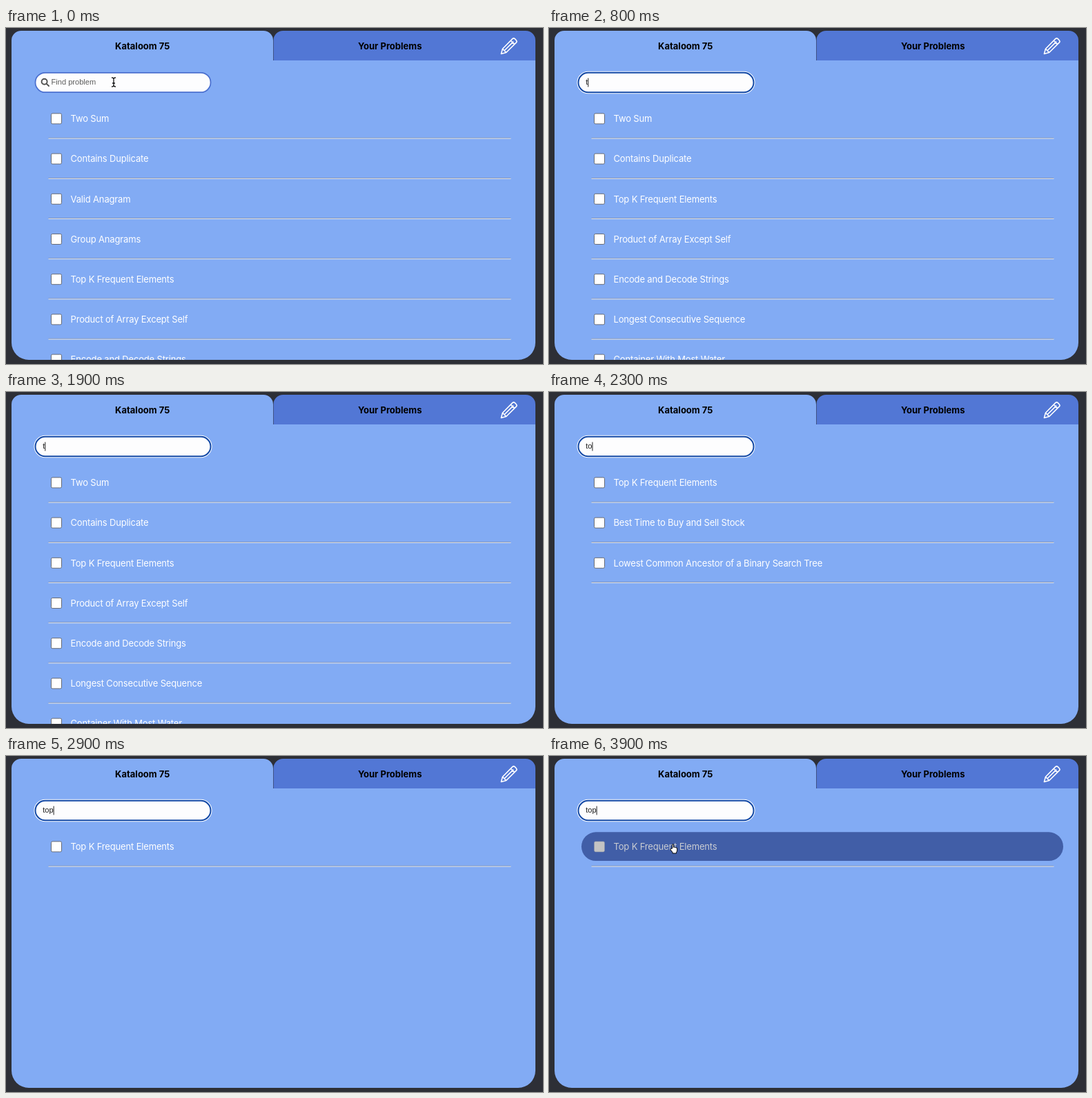
Recreate the animation shown at these times as an HTML page. Size 778 px wide and 487 px high, loop 4 s.

```html
<!DOCTYPE html>
<html lang="en">
<head>
<meta charset="utf-8">
<title>Problem search</title>
<style>
  html, body { margin: 0; width: 100%; height: 100%; overflow: hidden; background: #2d2f36; }
  svg { display: block; }
  .tab { font: 700 13px Inter, sans-serif; text-anchor: middle; }
  .row { font: 400 13px Inter, sans-serif; letter-spacing: -.16px; fill: #fff; }
  .box { fill: #fff; stroke: #686c75; }
  .pill { fill: none; }
  .hover .pill { fill: #415ea7; }
  .hover text { fill: #c9ccd2; }
  .hover .box { fill: #c3c3c3; stroke: #8f96a6; stroke-width: .6; }
  #query { font: 11.1px "Liberation Sans", Arial, sans-serif; }
  #field { fill: #fdfdfe; stroke: #4a6fcf; stroke-width: 1.7; }
  .focus #field { stroke: #1148a6; stroke-width: 2; }
  #ring { fill: none; stroke: #fff; stroke-width: 4; visibility: hidden; }
  .focus #ring { visibility: visible; }
  .focus #lens { visibility: hidden; }
</style>
</head>
<body>
<svg id="stage" width="778" height="487" viewBox="0 0 778 487">
  <defs>
    <path id="card" d="M8 18a14 14 0 0 1 14-14H373a14 14 0 0 1 14 14V47H767V456a25 25 0 0 1-25 25H33a25 25 0 0 1-25-25Z"/>
    <clipPath id="inside"><use href="#card"/></clipPath>
  </defs>
  <use href="#card" fill="#82abf4"/>
  <path d="M387.5 47V18a14 14 0 0 1 14-14H753a14 14 0 0 1 14 14V47Z" fill="#5277d5"/>
  <text class="tab" x="197.7" y="30.6">Kataloom 75</text>
  <text class="tab" x="556.2" y="30.6">Your Problems</text>
  <path d="M717.4 37.4L719.4 30.2L733.8 15.6Q735.5 14 737.2 15.6L739.2 17.7Q740.8 19.4 739.2 21.1L724.7 35.5ZM719.4 30.2L724.7 35.5M722 32.8L735.2 19.6M731.2 18.2L736.6 23.6"
    fill="none" stroke="#fff" stroke-width="1.6" stroke-linejoin="round"/>

  <g id="search">
    <rect id="ring" x="42.5" y="64.8" width="254" height="28.4" rx="14.2"/>
    <rect id="field" x="42.5" y="64.8" width="254" height="28.4" rx="14.2"/>
    <path id="lens" d="M59.3 81.3L62 84M59.6 77.7a4 4 0 1 1-8 0a4 4 0 1 1 8 0Z"
      fill="none" stroke="#505050" stroke-width="1.9" stroke-linecap="round"/>
    <text id="query" y="82.4"></text>
    <rect id="caret" y="72.6" width="1" height="12.8" fill="#222"/>
  </g>

  <g id="rows" clip-path="url(#inside)"></g>

  <g id="beam" fill="none" stroke-linecap="round">
    <path d="M-2.5-6.5Q0-6.5 0-4.5Q0-6.5 2.5-6.5M0-4.5V4.5M-2.5 6.5Q0 6.5 0 4.5Q0 6.5 2.5 6.5M-1.5 1.5H1.5" stroke="#fff" stroke-width="2.6"/>
    <path d="M-2.5-6.5Q0-6.5 0-4.5Q0-6.5 2.5-6.5M0-4.5V4.5M-2.5 6.5Q0 6.5 0 4.5Q0 6.5 2.5 6.5M-1.5 1.5H1.5" stroke="#111" stroke-width="1.3"/>
  </g>
  <path id="arrow" d="M0 0V11.3L2.6 8.9L4.6 13.4L6.6 12.5L4.6 8.1H8Z" fill="#000" stroke="#fff" stroke-width=".9"/>
  <path id="hand" d="M-2.4 0V-5Q-2.4-6.3-1.4-6.3T-.4-5V-1.6Q.6-2.5 1.4-1.4Q2.4-2.1 3.1-1Q4.6-1.5 4.6.3V2.6Q4.6 4.4 3.6 5.4V7H-2V5.6L-5 1.8Q-5.4.2-4 .2Z"
    fill="#fff" stroke="#000" stroke-width="1"/>
</svg>

<script>
const problems = [
  "Two Sum", "Contains Duplicate", "Valid Anagram", "Group Anagrams",
  "Top K Frequent Elements", "Product of Array Except Self",
  "Encode and Decode Strings", "Longest Consecutive Sequence",
  "Container With Most Water", "Best Time to Buy and Sell Stock",
  "Lowest Common Ancestor of a Binary Search Tree"
];
const LOOP = 4000, STEP = 100, BLINK = 500, PITCH = 58.2;
const FOCUS = 100, HIDE = 600, HOVER = 3800;
const keys = [[700, "t"], [2200, "to"], [2800, "top"]];
// time, shape, x, y
const pointerPath = [
  [0, "beam", 156, 78.5], [HIDE, "", 0, 0],
  [3500, "beam", 160, 79], [3600, "beam", 176, 88],
  [3700, "arrow", 180.3, 99.3], [HOVER, "hand", 181, 127], [3900, "hand", 181, 134]
];

const $ = id => document.getElementById(id);
const latest = (list, t) => list.filter(e => e[0] <= t).pop();

function rowMarkup(name, i) {
  return `<g class="row" transform="translate(0 ${i * PITCH})">
    <rect class="pill" x="47" y="110.3" width="698" height="41.8" rx="20.9"/>
    <rect class="box" x="65.5" y="123.9" width="15" height="15" rx="1.8"/>
    <text x="93.5" y="136.3">${name}</text>
    <path d="M61.5 159.3H731" stroke="#7f8ba6" stroke-width=".8"/>
    <path d="M61.5 160.2H731.5" stroke="#e3e5e8" stroke-width="1"/>
  </g>`;
}

let shown = null;
function showRows(query) {
  if (query === shown) return;
  shown = query;
  $("rows").innerHTML = problems
    .filter(name => name.toLowerCase().includes(query))
    .slice(0, 7).map(rowMarkup).join("");
}

function draw(t) {
  const [typedAt, query] = latest(keys, t) || [FOCUS, ""];
  const focused = t >= FOCUS;
  showRows(query);
  $("rows").firstElementChild.classList.toggle("hover", t >= HOVER);
  $("search").classList.toggle("focus", focused);

  const text = $("query");
  text.textContent = query || "Find problem";
  text.setAttribute("x", focused ? 53.2 : 65.5);
  text.setAttribute("fill", query ? "#1c1c1c" : "#5c5c5c");

  const caretOn = focused && Math.floor((t - typedAt) / BLINK) % 2 === 0;
  $("caret").style.visibility = caretOn ? "visible" : "hidden";
  $("caret").setAttribute("x", 53.2 + (query ? text.getComputedTextLength() : 0));

  const [, shape, x, y] = latest(pointerPath, t);
  for (const id of ["beam", "arrow", "hand"]) {
    $(id).style.visibility = id === shape ? "visible" : "hidden";
    $(id).setAttribute("transform", `translate(${x} ${y})`);
  }
}

const start = performance.now();
function tick() {
  const t = (performance.now() - start) % LOOP;
  draw(Math.floor(t / STEP) * STEP);
  requestAnimationFrame(tick);
}
tick();
</script>
</body>
</html>
```
